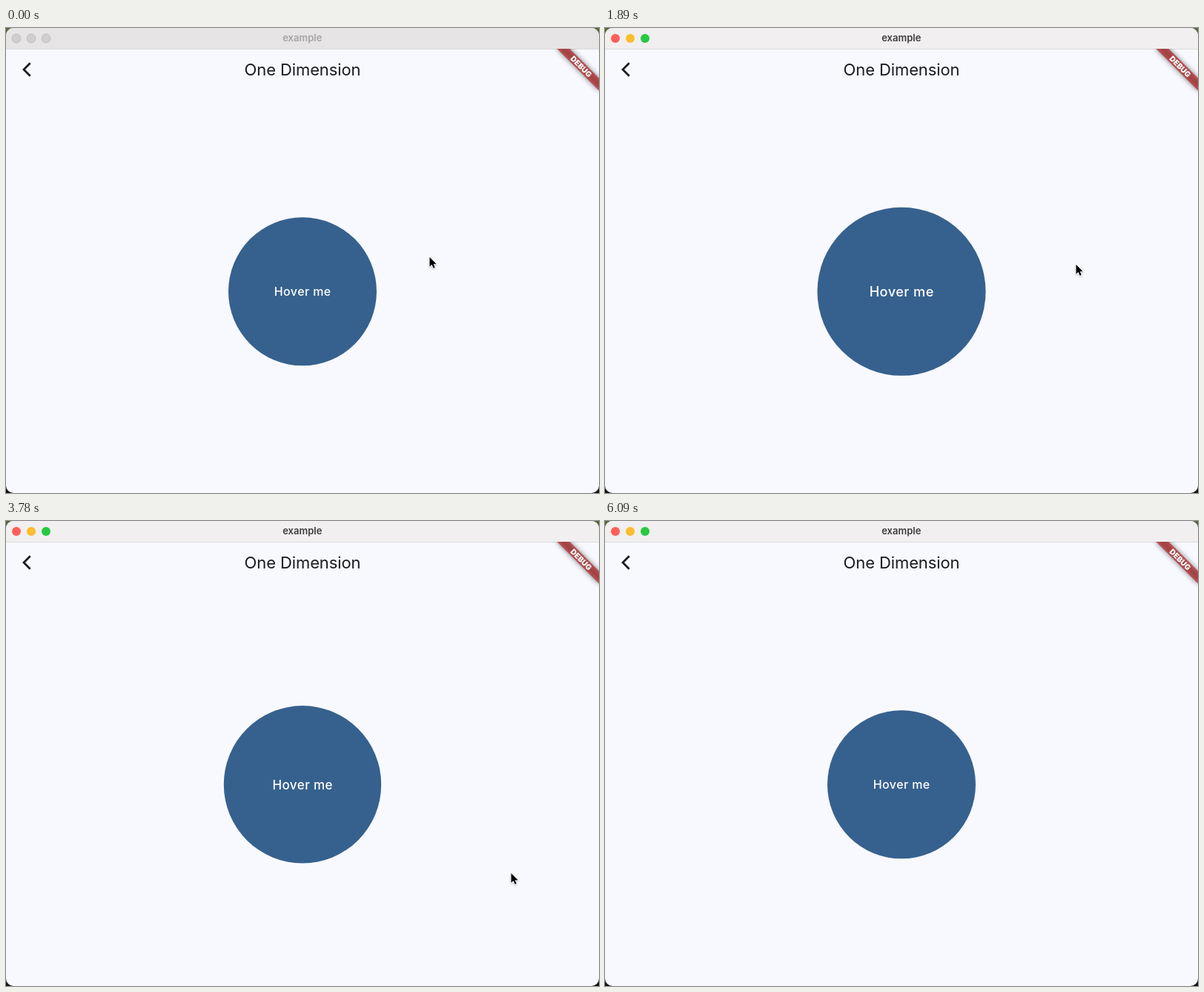
Animation, 800 px wide and 627 px high, one loop 6.3 s. Source, as an HTML page:

```html
<!DOCTYPE html>
<html lang="en">
<head>
<meta charset="utf-8">
<title>One Dimension</title>
<style>
  html, body { margin: 0; width: 100%; height: 100%; overflow: hidden; }
  body { background: linear-gradient(#59683c, #141414); }
  svg { display: block; width: 800px; height: 627px; }
  text { font-family: Inter, Roboto, sans-serif; text-anchor: middle; }
  .idle #bar { fill: #e6e4e4; }
  .idle #name { fill: #a5a3a3; }
  .idle #lights circle { fill: #d0cece; stroke: #0003; stroke-width: .6; }
</style>
</head>
<body>
<svg id="stage" viewBox="0 0 800 627">
  <defs>
    <clipPath id="frame"><rect width="800" height="627" rx="10"/></clipPath>
    <filter id="blur" x="-30%" y="-200%" width="160%" height="500%"><feGaussianBlur stdDeviation="3.5"/></filter>
    <filter id="drop" x="-50%" y="-50%" width="200%" height="200%"><feDropShadow dx="0" dy="1" stdDeviation="1" flood-opacity=".3"/></filter>
  </defs>
  <g clip-path="url(#frame)">
    <rect width="800" height="627" fill="#f8f9ff"/>
    <rect y="28" width="800" height="1" fill="#dcdce0"/>
    <polyline points="32.7,47.3 24,56 32.7,64.7" fill="none" stroke="#191c20" stroke-width="2.8"/>
    <text x="400" y="64" font-size="22" letter-spacing="-.1" fill="#191c20">One Dimension</text>

    <g id="ball">
      <circle r="100" fill="#36618e"/>
      <text x=".2" y="6" font-size="16" font-weight="450" letter-spacing=".4" fill="#fff">Hover me</text>
    </g>

    <g transform="translate(800 28) rotate(45)">
      <rect x="-40" y="28" width="80" height="12" opacity=".5" filter="url(#blur)"/>
      <rect x="-40" y="28" width="80" height="12" fill="#b71c1c" opacity=".63"/>
      <text y="37.7" font-size="10.2" font-weight="900" fill="#fff">DEBUG</text>
    </g>

    <rect id="bar" width="800" height="28" fill="#f1efef"/>
    <g id="lights">
      <circle cx="14" cy="14" r="6" fill="#ff5f57"/>
      <circle cx="34" cy="14" r="6" fill="#febc2e"/>
      <circle cx="54" cy="14" r="6" fill="#28c840"/>
    </g>
    <text id="name" x="399.8" y="18" font-size="13" font-weight="600" fill="#3d3b3b">example</text>

    <g id="pointer" filter="url(#drop)" stroke-linejoin="round">
      <path id="arrow" d="M.5 0V12.8L3.5 10L5.6 14.8L7.7 13.9L5.7 9.2H9.7Z" stroke="#fff" stroke-width="1.4" paint-order="stroke"/>
      <path id="hand" transform="translate(0 -1)" fill="#fff" stroke="#000" d="M-1 0Q-3-1-3.2 1L-.6 8L-3.3 6.5Q-5.5 7-4 9L.5 14V16H8V13.5Q9.6 11 9 6Q8.3 4.4 7 5.5Q6 3.6 4.4 4.6Q3.3 3 2 4.2ZM3 9V13M5 9V13M7 9V13"/>
    </g>
  </g>
</svg>
<script>
  const LOOP = 6300, STEP = 70, ACTIVATE = 280;
  const CX = 400, CY = 355.3, RADIUS = 100;
  const $ = id => document.getElementById(id);

  // Pointer strokes in and out of the ball: start, duration, end x, end y
  const home = [571, 309];
  const strokes = [
    [280, 320, 410, 348], [1610, 210, 635, 319],
    [2450, 390, 390, 345], [3442, 270, 681, 475],
    [3780, 190, 420, 360], [4110, 155, 572, 408],
    [4430, 260, 420, 360], [5060, 260, 640, 435],
    [5700, 380, 720, 645]
  ];

  const smooth = u => u * u * (3 - 2 * u);

  function pointerAt(time) {
    let [x, y] = home;
    for (const [start, duration, endX, endY] of strokes) {
      if (time <= start) break;
      const k = smooth(Math.min(1, (time - start) / duration));
      x += (endX - x) * k;
      y += (endY - y) * k;
    }
    return [x, y];
  }

  // The ball springs to 1.5 while the pointer is over it (500 ms period, damping ratio 0.7)
  function simulate(time) {
    const omega = 2 * Math.PI / .5, dt = .001;
    let scale = 1, speed = 0;
    for (let t = 0; ; t++) {
      const pointer = pointerAt(t);
      const over = Math.hypot(pointer[0] - CX, pointer[1] - CY) < RADIUS * scale;
      if (t >= time) return { scale, pointer, over };
      const goal = over ? 1.5 : 1;
      speed += (omega * omega * (goal - scale) - 1.4 * omega * speed) * dt;
      scale += speed * dt;
    }
  }

  function draw() {
    const t = Math.floor(performance.now() % LOOP / STEP) * STEP;
    const { scale, pointer, over } = simulate(t);
    $('stage').classList.toggle('idle', t < ACTIVATE);
    $('ball').setAttribute('transform', `translate(${CX} ${CY}) scale(${scale})`);
    $('pointer').setAttribute('transform', `translate(${pointer})`);
    $('arrow').style.display = over ? 'none' : '';
    $('hand').style.display = over ? '' : 'none';
    requestAnimationFrame(draw);
  }
  draw();
</script>
</body>
</html>
```
